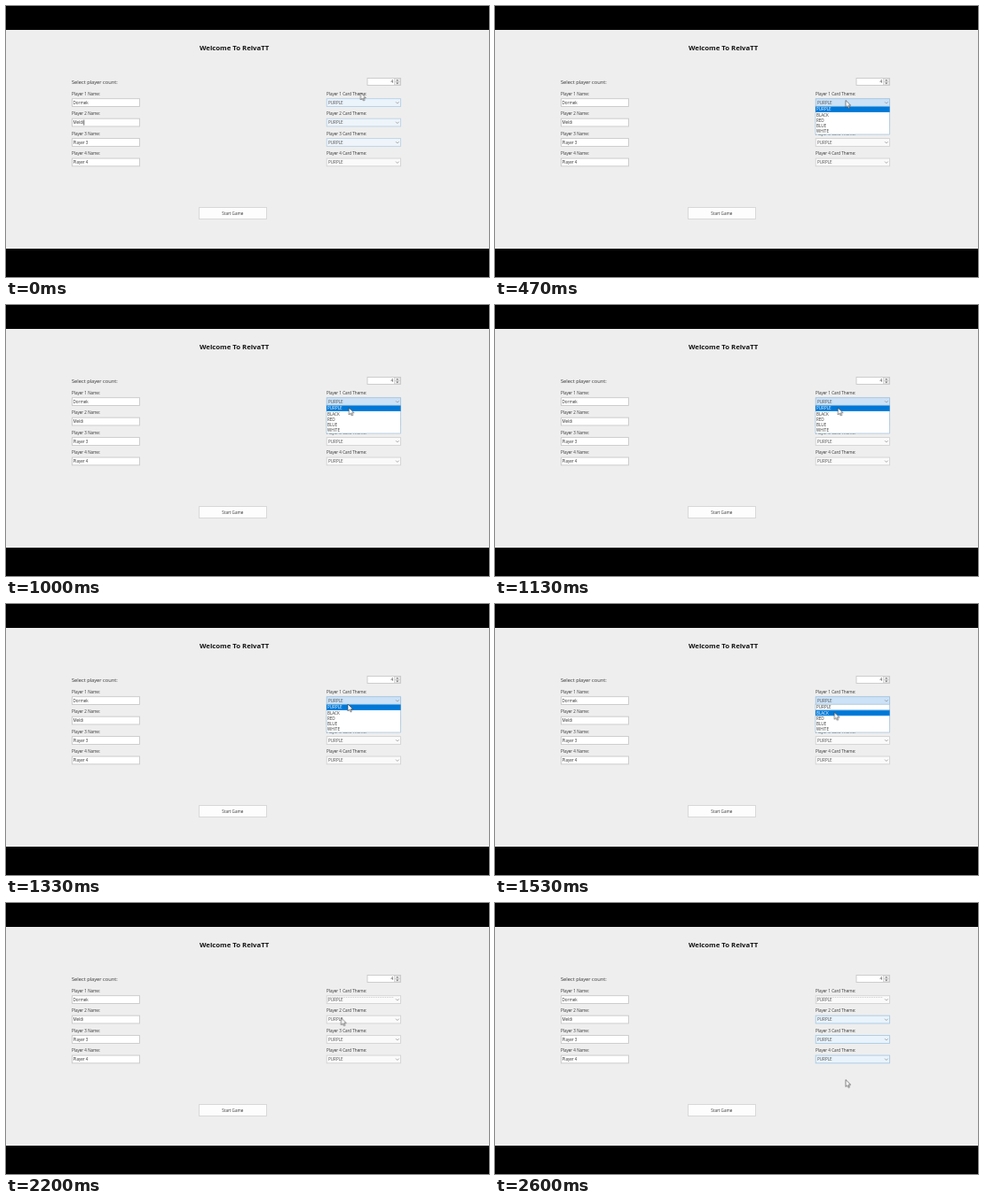
An HTML page for the animation above (2.67 s loop, 544 by 306 pixels).

```html
<!DOCTYPE html>
<html lang="en">
<head>
<meta charset="utf-8">
<title>Game setup</title>
<style>
  html, body { margin: 0; width: 100%; height: 100%; overflow: hidden; background: #000; }
  svg { display: block; width: 100%; height: 100%; }
  text { font: 4.57px "Open Sans", "Noto Sans", sans-serif; fill: #333; }
  .title { font-size: 7.75px; font-weight: 700; fill: #111; }
  .count { font-size: 5.7px; }
  .box { fill: #fff; stroke: #c8c8c8; stroke-width: .9; }
  .combo { fill: #fafafa; stroke: #d2d2d2; stroke-width: .9; }
  .value { fill: #4a4a4a; }
  .chevron { fill: none; stroke: #777; stroke-width: .6; }
  .dotted { fill: none; stroke: #aaa; stroke-width: .6; stroke-dasharray: 1 1; }

  /* 40 ticks per loop: one tick is 2.5% */
  .anim, .combo, #popup .item { animation: 2670ms step-end -10ms infinite; }
  #cursor { animation-name: point; }
  #popup { animation-name: open; }
  #focus { animation-name: focus; }
  #caret { animation-name: caret; }
  #highlight { animation-name: highlight; }
  #popup .item0 { animation-name: first; }
  #popup .item1 { animation-name: second; }
  .combo0 { animation-name: combo0; }
  .combo1 { animation-name: combo1; }
  .combo2 { animation-name: combo2; }
  .combo3 { animation-name: combo3; }

  @keyframes point {
    0%    { transform: translate(399.5px, 98px);  animation-timing-function: steps(7); }
    17.5% { transform: translate(395px, 106.5px); }
    22.5% { transform: translate(395px, 106.5px); animation-timing-function: steps(6); }
    37.5% { transform: translate(386.3px, 116px); }
    42.5% { transform: translate(386.3px, 116px); animation-timing-function: steps(3); }
    50%   { transform: translate(385px, 113px);   animation-timing-function: steps(2); }
    55%   { transform: translate(384px, 117.5px); }
    57.5% { transform: translate(382.3px, 122.3px); }
    60%   { transform: translate(382.3px, 117px); }
    65%   { transform: translate(382.3px, 116.3px); }
    75%   { transform: translate(382px, 118px);   animation-timing-function: steps(3); }
    82.5% { transform: translate(377.5px, 129.7px); animation-timing-function: steps(3); }
    90%   { transform: translate(392px, 232px); }
    92.5% { transform: translate(394px, 235px);   animation-timing-function: steps(2); }
    97.5%, 100% { transform: translate(395px, 199.5px); }
  }
  @keyframes open { 0%, 75%, 100% { visibility: hidden; } 12.5% { visibility: visible; } }
  @keyframes focus { 0%, 100% { visibility: hidden; } 75% { visibility: visible; } }
  @keyframes caret { 0% { visibility: visible; } 12.5%, 100% { visibility: hidden; } }
  @keyframes highlight { 0%, 60%, 100% { transform: none; } 57.5% { transform: translateY(6.25px); } }
  @keyframes first { 0%, 60%, 100% { fill: #fff; } 57.5% { fill: #333; } }
  @keyframes second { 0%, 60%, 100% { fill: #333; } 57.5% { fill: #fff; } }
  @keyframes combo0 {
    0% { fill: #ebf3fb; stroke: #b4cfe6; }
    12.5% { fill: #cce2f7; stroke: #a3c3df; }
    75% { fill: #e0eefa; stroke: #b9d0e4; animation-timing-function: steps(2); }
    80%, 100% { fill: #fafafa; stroke: #d2d2d2; }
  }
  @keyframes combo1 {
    0% { fill: #eef4fa; stroke: #bcd2e6; }
    12.5% { fill: #fafafa; stroke: #d2d2d2; }
    85%, 100% { fill: #e9f3fb; stroke: #a9c9e3; }
  }
  @keyframes combo2 {
    0% { fill: #eef4fa; stroke: #bcd2e6; }
    12.5% { fill: #fafafa; stroke: #d2d2d2; }
    87.5%, 100% { fill: #e9f3fb; stroke: #a9c9e3; }
  }
  @keyframes combo3 {
    0% { fill: #fafafa; stroke: #d2d2d2; }
    87.5%, 100% { fill: #e9f3fb; stroke: #a9c9e3; }
  }
</style>
</head>
<body>
<svg viewBox="0 0 544 306">
  <rect width="544" height="306"/>
  <rect y="27" width="544" height="247" fill="#eee"/>
  <text class="title" x="218" y="49.8">Welcome To RelvaTT</text>
  <text class="count" x="74" y="87.6">Select player count:</text>

  <rect class="box" x="407" y="81.5" width="37.5" height="8"/>
  <text x="436" y="87.3" text-anchor="end">4</text>
  <rect x="437.5" y="82" width="6.5" height="7" fill="#eee" stroke="#c8c8c8" stroke-width=".6"/>
  <path d="M437.5 85.5h6.5" stroke="#c8c8c8" stroke-width=".6"/>
  <path d="M439.3 84.6l1.5-1.7 1.5 1.7zM439.3 86.5l1.5 1.7 1.5-1.7z" fill="#666"/>

  <g id="rows"></g>
  <path id="caret" class="anim" d="M87.8 128.6v6" stroke="#222" stroke-width=".7"/>
  <path id="focus" class="anim dotted" d="M362.5 111.9v-5.4h74.5"/>

  <rect x="217.5" y="227.5" width="76" height="13" fill="#fdfdfd" stroke="#d8d8d8"/>
  <text x="255.3" y="235.7" text-anchor="middle">Start Game</text>

  <g id="popup" class="anim">
    <rect x="361" y="113.2" width="83.6" height="31.8" fill="#fff" stroke="#9dbdd8" stroke-width=".7"/>
    <rect id="highlight" class="anim" x="361" y="113.5" width="83.6" height="6.4" fill="#0078d7"/>
    <clipPath id="inside"><rect x="361" y="113" width="84" height="31.7"/></clipPath>
    <g id="items" clip-path="url(#inside)"></g>
  </g>

  <path id="cursor" class="anim" d="M0 0V8L1.9 6.3 3.1 9 4.4 8.4 3.2 5.8H5.7Z"
        fill="#fff" stroke="#333" stroke-width=".6"/>
</svg>
<script>
  const names = ["Dormek", "Meldi", "Player 3", "Player 4"];
  const themes = ["PURPLE", "BLACK", "RED", "BLUE", "WHITE"];
  const label = (x, y, s, cls = "") => `<text class="${cls}" x="${x}" y="${y}">${s}</text>`;
  const box = (cls, x, y, w) => `<rect class="${cls}" x="${x}" y="${y}" width="${w}" height="8.8"/>`;

  document.getElementById("rows").innerHTML = names.map((name, i) => {
    const dy = 22.45 * i, top = 104.7 + dy;
    return label(74, 100.7 + dy, `Player ${i + 1} Name:`)
      + box("box", 74.5, top, 76)
      + label(75.5, 110.7 + dy, name)
      + label(361, 100.7 + dy, `Player ${i + 1} Card Theme:`)
      + box(`combo combo${i}`, 361.2, top, 83.3)
      + label(363, 110.7 + dy, "PURPLE", "value")
      + `<path class="chevron" d="M439 ${top + 3.6}l1.8 1.8 1.8-1.8"/>`;
  }).join("");

  document.getElementById("items").innerHTML = themes.map((theme, i) =>
    label(362, 118.4 + 6.25 * i, theme, `item item${i}`)).join("");
</script>
</body>
</html>
```
